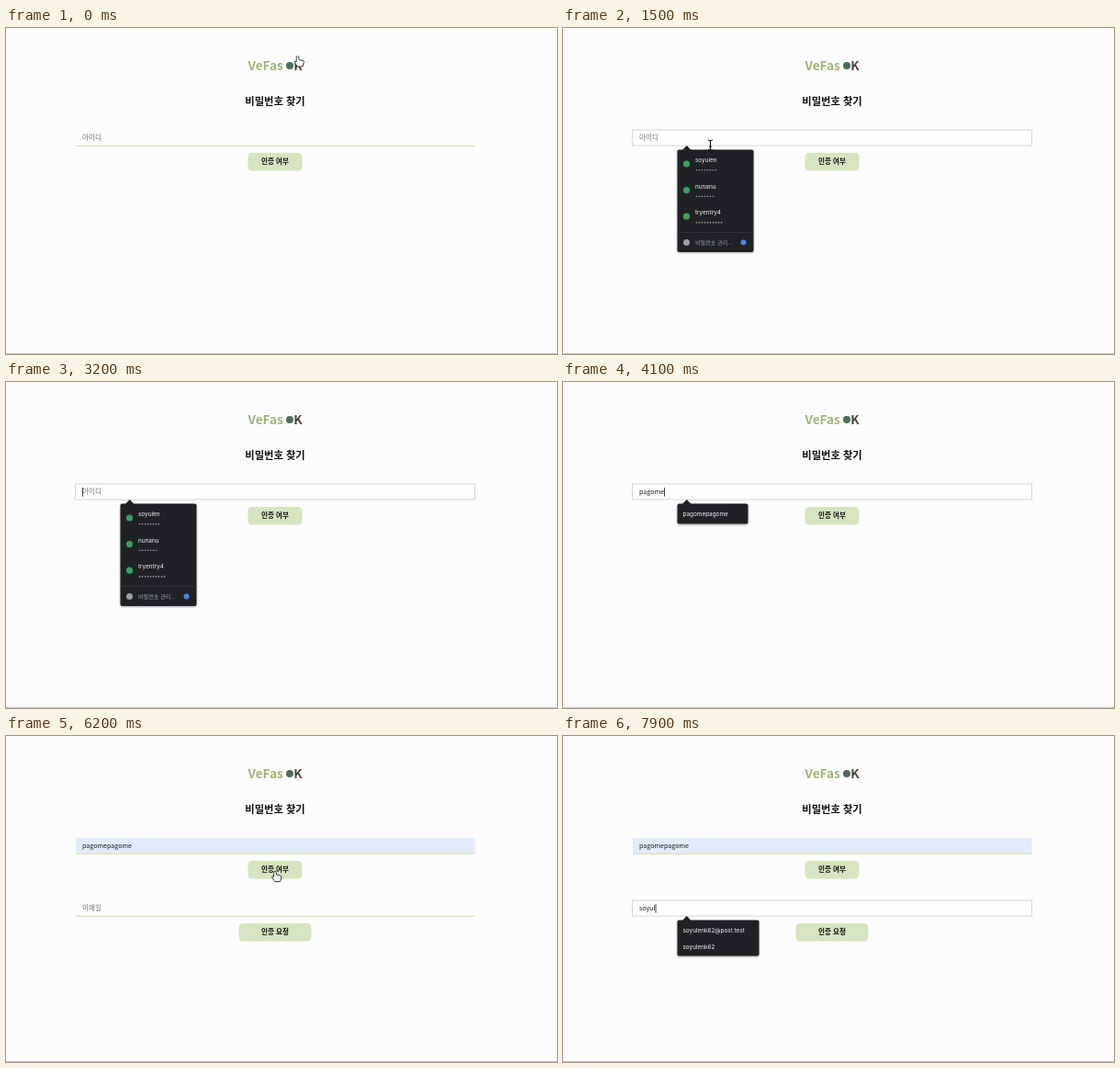
These frames come from a looping animation (600x355 px, 8000 ms). An HTML page:

```html
<!DOCTYPE html>
<html lang="ko">
<head>
<meta charset="utf-8">
<title>비밀번호 찾기</title>
<style>
  html, body { margin: 0; width: 100%; height: 100%; overflow: hidden; background: #fcfcfc; }
  svg { display: block; }
  text { font: 7.1px "Noto Sans CJK KR", "Noto Sans CJK", "Noto Sans CJK JP", sans-serif; fill: #1c1c1c; }
  .brand { font-size: 13.6px; font-weight: 700; }
  .title { font-size: 11.3px; font-weight: 700; fill: #111; }
  .label { font-size: 7.6px; font-weight: 700; fill: #111; }
  .hint { font-size: 7.6px; fill: #757575; }
  .item { font: 6.4px Inter, "Noto Sans CJK KR", sans-serif; fill: #f1f3f4; }
  .manage { font-size: 6.1px; fill: #9aa0a6; }
  .under { stroke: #d5e6b8; stroke-width: 1.2; }
  .popup { filter: drop-shadow(0 1px 1px #0005); }
</style>
</head>
<body>
<svg id="stage" width="600" height="355" viewBox="0 0 600 355"></svg>
<script>
const LOOP = 8000, STEP = 100;
const ID = 'pagomepagome', USER = 'soyulenk62';
const $ = id => document.getElementById(id);

const text = (x, y, cls, str, extra = '') =>
  `<text x="${x}" y="${y}" class="${cls}" ${extra}>${str}</text>`;

const button = (y, w, label) =>
  `<rect x="${293 - w / 2}" y="${y}" width="${w}" height="19.5" rx="4.5" fill="#d6e5bf"/>` +
  text(293, y + 12.2, 'label', label, 'text-anchor="middle"');

const field = (id, y, hint) => `<g id="${id}">
  <rect class="box" y="${y}"/>
  <path class="under" d="M76 ${y + 17.4}H510.5"/>
  ${text(83, y + 10.8, 'hint', hint)}
  ${text(83, y + 10.5, 'value', '')}
  <rect class="caret" y="${y + 4}" width=".8" height="9.6" fill="#111"/></g>`;

const popup = (id, y, w, h, body) => `<g id="${id}" class="popup">
  <path d="M129.5 ${y + 1}L134.7 ${y - 4.5}L140 ${y + 1}Z" fill="#202124"/>
  <rect x="124.5" y="${y}" width="${w}" height="${h}" rx="2" fill="#202124"/>${body}</g>`;

const list = (y, items) => items.map((s, i) => text(130.5, y + 17.7 * i, 'item', s)).join('');

const account = ([name, dots], i) => {
  const y = 146 + 28.6 * i;
  return `<circle cx="134.5" cy="${y + 2}" r="3.6" fill="#36a35a"/>` + text(144, y, 'item', name) +
    `<path d="M144.8 ${y + 8.7}h${dots * 3 - 1}" stroke="#b4b7bb" stroke-width="1.1" stroke-dasharray="1.5 1.5"/>`;
};

const accounts = [['soyulen', 8], ['nunanu', 7], ['tryentry4', 10]].map(account).join('') +
  `<path d="M124.5 222.5h83" stroke="#35363a" stroke-width=".8"/>
  <circle cx="134.5" cy="233.5" r="3.5" fill="#9aa0a6"/>` +
  text(144, 235.8, 'manage', '비밀번호 관리...') +
  '<circle cx="196.5" cy="233.5" r="3" fill="#4285f4"/>';

$('stage').innerHTML =
  text(263.5, 46, 'brand', 'VeFas', 'style="fill:#9fb577"') +
  '<circle cx="309" cy="41" r="4" fill="#44705a"/>' +
  text(313.2, 46, 'brand', 'K', 'style="fill:#4c433e"') +
  text(293, 84, 'title', '비밀번호 찾기', 'text-anchor="middle"') +
  field('login', 111, '아이디') + button(136, 59, '인증 여부') +
  `<g id="mailRow">${field('mail', 179, '이메일')}${button(204, 79, '인증 요청')}</g>` +
  popup('saved', 132.5, 83, 111.5, accounts) +
  popup('match', 132.5, 77, 22,
    '<rect id="hover" x="124.5" y="136" width="77" height="16" fill="#3c4043"/>' + list(145.8, [ID])) +
  popup('mails', 200.5, 89, 110, list(213.8, [USER + '@post.test', 'bwbw7384@dome.test',
    'bwbw7384@post.test', 'a', 'vjvj604@dome.test', 'bwbw7384@posttest'])) +
  popup('mailMatch', 200.5, 89, 39, list(213.8, [USER + '@post.test', USER])) +
  `<path d="M0 354.5H600" stroke="#c6c6c6"/>
  <g id="pointer">
    <path id="hand" d="M-1.2 .8Q0-.6 1.2 .8L1.6 4 6 5Q7.2 5.4 6.8 7L5.6 11.5H-.2L-3.6 6.6Q-3.4 5.2-1.4 6.4Z"
      fill="#fff" stroke="#222" stroke-width=".9"/>
    <path id="arrow" d="M0 0V11L2.5 8.7 4.1 12.4 6 11.6 4.4 8H7.7Z" fill="#000" stroke="#fff" stroke-width=".6"/>
    <path id="beam" d="M-2.6-5.5Q0-5.5 0-4V4Q0 5.5-2.6 5.5M2.6-5.5Q0-5.5 0-4M0 4Q0 5.5 2.6 5.5M-1.4 1.6H1.4"
      fill="none" stroke="#111" stroke-width="1.1"/>
  </g>`;

// [time, text]: a wrong keyboard layout first, then erased and typed again
const idKeys = [[800, ''], [2000, 'ㅎ'], [2100, '해'], [2300, '해ㅗ'], [2400, '해ㅙ'], [2800, '해ㅗ'],
  [2900, '해'], [3000, 'ㅎ'], [3100, ''], [3400, 2], [3600, 3], [3800, 4], [4000, 5], [4100, 6]]
  .map(([t, s]) => [t, s > 0 ? ID.slice(0, s) : s]);
const mailKeys = [[6700, 0], [7400, 1], [7500, 2], [7700, 4], [7900, 5]]
  .map(([t, n]) => [t, USER.slice(0, n)]);

// [time, x, y] of the pointer's hot spot
const route = [[0, 317.5, 30.5], [800, 162, 121], [1500, 160.5, 127.5], [4500, 172, 8],
  [5000, 189, 134], [5100, 191.5, 135.5], [5400, 191.5, 135.5], [6000, 293, 147],
  [6200, 293, 147], [6700, 179, 190], [8000, 179, 190]];

const between = (t, a, b) => t >= a && t < b;
const show = (id, on) => { $(id).style.display = on ? '' : 'none'; };
const last = (keys, t) => keys.filter(k => k[0] <= t).pop() || [0, ''];
const blink = (t, from) => (t - from) % 1000 < 500;

function place(t) {
  const i = Math.max(1, route.findIndex(k => k[0] > t));
  const [t0, x0, y0] = route[i - 1], [t1, x1, y1] = route[i];
  const u = (t - t0) / (t1 - t0), e = u * u * (3 - 2 * u);
  return [x0 + (x1 - x0) * e, y0 + (y1 - y0) * e];
}

function drawField(id, value, focus, filled, caret) {
  const part = cls => $(id).querySelector('.' + cls);
  const frame = focus && !filled;
  const set = (el, attrs) => { for (const k in attrs) el.setAttribute(k, attrs[k]); };
  set(part('box'), {
    x: frame ? 75.5 : 76, width: frame ? 435 : 434.5, height: 17,
    fill: filled ? '#e1ebfc' : frame ? '#fefefe' : 'none', stroke: frame ? '#d6d6d6' : 'none'
  });
  part('under').style.display = frame ? 'none' : '';
  part('hint').style.display = value ? 'none' : '';
  const label = part('value');
  label.textContent = value;
  set(part('caret'), { x: 83 + (value ? label.getComputedTextLength() : 0), opacity: +caret });
}

function drawPointer(t) {
  const [x, y] = place(t);
  const over = (x0, y0, x1, y1) => between(x, x0, x1) && between(y, y0, y1);
  const kind = over(262, 28, 324, 50) || over(263, 136, 323, 156) ? 'hand'
    : over(76, 111, 511, 129) || t >= 6100 && over(76, 179, 511, 197) ? 'beam' : 'arrow';
  $('pointer').setAttribute('transform', `translate(${x} ${y})`);
  for (const k of ['hand', 'arrow', 'beam']) show(k, k === kind);
  show('pointer', !between(t, 2000, 4600) && t < 7400);
}

function draw(now) {
  const t = Math.floor(now % LOOP / STEP) * STEP;
  const filled = t >= 5000;
  const [idTime, idText] = last(idKeys, t), [mailTime, mailText] = last(mailKeys, t);
  const mailFocus = t >= 6700;

  show('mailRow', t >= 6100);
  drawField('login', filled ? ID : idText, between(t, 800, 6100), filled,
    between(t, 800, 6100) && blink(t, t >= 5400 ? 5400 : idTime));
  drawField('mail', mailText, mailFocus, false, mailFocus && blink(t, mailTime));

  show('saved', between(t, 900, 2000) || between(t, 3200, 3400));
  show('match', between(t, 3400, 5400));
  show('hover', filled);
  show('mails', between(t, 6700, 7400));
  show('mailMatch', t >= 7400);
  drawPointer(t);
}

const start = performance.now();
(function tick() {
  draw(performance.now() - start);
  requestAnimationFrame(tick);
})();
</script>
</body>
</html>
```
